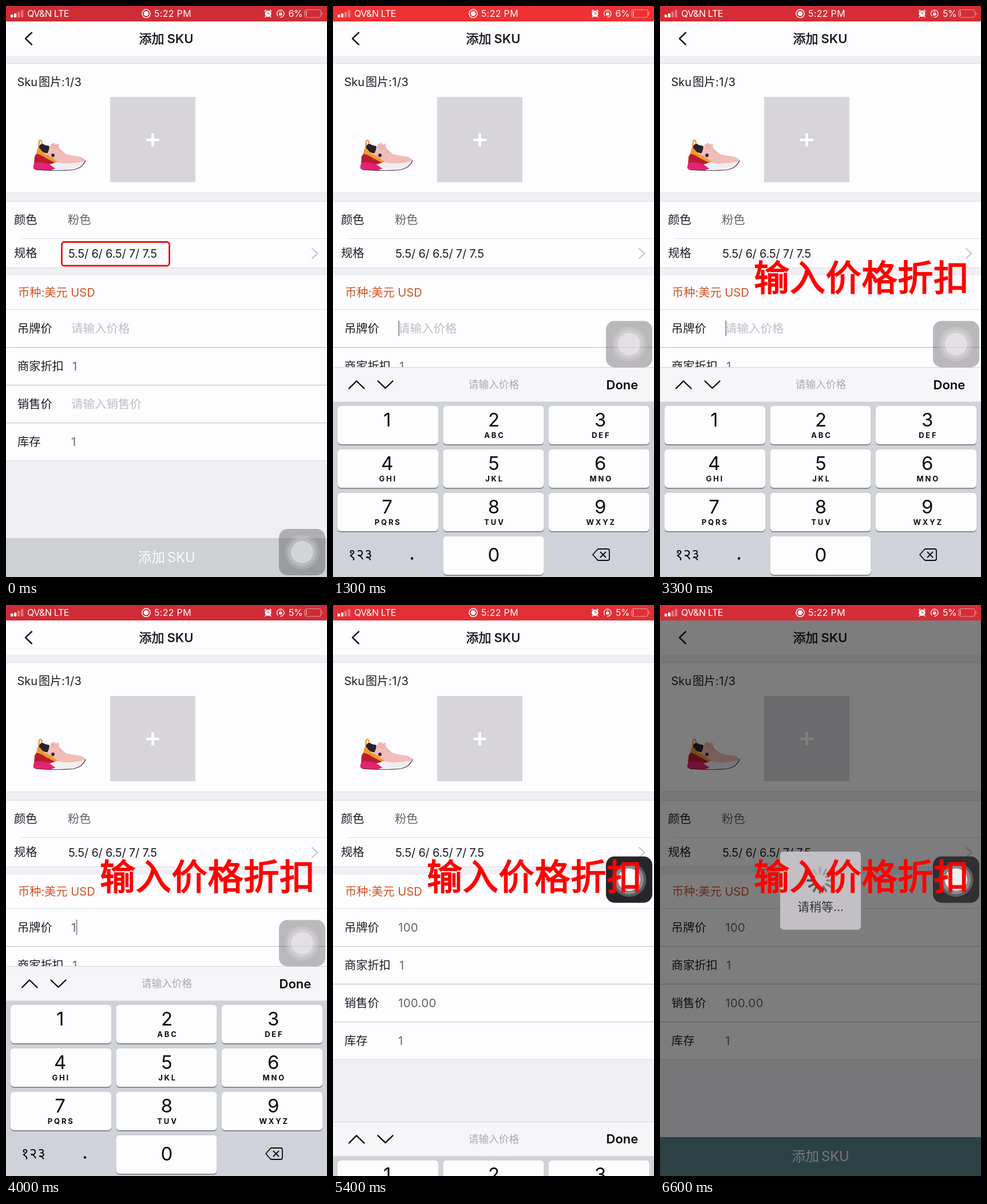
An HTML page for the animation above (6700 ms loop, 561x998 px).

```html
<!DOCTYPE html>
<html lang="zh">
<head>
<meta charset="utf-8">
<title>添加SKU</title>
<style>
html, body { margin: 0; width: 100%; height: 100%; overflow: hidden; background: #f0eff4; }
svg { display: block; width: 100vw; height: 100vh; }
text { font-family: Inter, "Noto Sans CJK SC", "Noto Sans CJK", sans-serif; white-space: pre; }
.line { fill: none; stroke-linecap: round; stroke-linejoin: round; }
.hindi { font-family: "Noto Sans Devanagari", "Noto Sans", sans-serif; }
</style>
</head>
<body>
<svg id="stage" viewBox="0 0 561 998" preserveAspectRatio="none"></svg>
<script>
const LOOP = 6700, STEP = 100;
const INK = '#1d1c20', GREY = '#646367', HINT = '#bfbec3', CARD = '#fdfcfe', KEY = '#0b0b0d';

const rect = (x, y, w, h, fill, more = '') =>
  `<rect x="${x}" y="${y}" width="${w}" height="${h}" fill="${fill}" ${more}/>`;
const circle = (x, y, r, fill, more = '') =>
  `<circle cx="${x}" cy="${y}" r="${r}" fill="${fill}" ${more}/>`;
const path = (d, fill, more = '') => `<path d="${d}" fill="${fill}" ${more}/>`;
const line = (d, color, width, more = 'class="line"') =>
  `<path d="${d}" stroke="${color}" stroke-width="${width}" ${more}/>`;
const text = (x, y, size, fill, str, more = '') =>
  `<text x="${x}" y="${y}" font-size="${size}" fill="${fill}" ${more}>${str}</text>`;
const group = (id, body) => `<g id="${id}">${body}</g>`;
const MID = 'text-anchor="middle"';

function statusBar() {
  const bars = [5, 7, 10, 13].map((h, i) =>
    rect(8 + i * 6, 20 - h, 4.3, h, '#fff', `rx="1" opacity="${i < 2 ? 1 : .35}"`)).join('');
  const clock = circle(458, 13.5, 5.6, '#fff') +
    line('M452.5 9l2-1.8M463.5 9l-2-1.8M454 18.5l-1 1M462 18.5l1 1', '#fff', 1.6) +
    line('M458 10.5v3.2h2.6', '#d22d36', 1);
  const lock = line('M475 17.5a6.3 6.3 0 1 1 4.5 2.2', '#fff', 1.3) +
    rect(477, 12.5, 5.6, 4, '#fff', 'rx=".8"') + line('M478.4 12.5v-1.2a1.4 1.4 0 0 1 2.8 0v1.2', '#fff', 1);
  const battery = rect(522, 6.5, 28.5, 13.5, 'none', 'rx="4" stroke="#fff" stroke-opacity=".5" stroke-width="1.2"') +
    rect(524, 8.5, 1.6, 9.5, '#fff', 'rx=".8" opacity=".6"') +
    path('M552 11q2.6 2.2 0 4.6z', '#fff', 'opacity=".5"');
  return rect(0, 0, 561, 27, '#d02c36', 'id="bar"') + bars +
    text(37, 19, 16, '#fff', 'QV&amp;N LTE', 'letter-spacing="-.4"') +
    circle(245, 13.3, 7.2, 'none', 'stroke="#fff" stroke-width="1.5"') + circle(245, 13.3, 4.3, '#fff') +
    text(259, 19, 16, '#fff', '5:22 PM', 'letter-spacing=".3"') + clock + lock +
    text(518.5, 19, 16, '#fff', '6%', 'id="charge" text-anchor="end" letter-spacing="-.3"') + battery;
}

function shoe() {
  return line('M57 247l1-11q2-3 4 0l2 9', '#f0932b', 2.2) +
    path('M57 249l2-6q4-4 9 0l8 2q0 7-4 13-10-2-15-9z', '#2a2229') +
    path('M70 262q6-8 8-20l6-3 3 3 5-2 1 9 12 10q12 3 24 4 11 4 10 9l-5 3q-25 2-40 1l-20-7z', '#f2bdb8') +
    line('M79 247l9 3M80 243l9 3M92 249l5 8', '#dfa19f', 1.3) +
    path('M50 263l4-6q10 2 17 8l17 9-6 5-24-4-9 2z', '#b91c31') +
    path('M53 258l2-9q3-2 5 1 5 8 14 11l16 11-4 2-16-8q-8-6-17-8z', '#f09a28') +
    path('M48 279q1-7 10-6l20 3 9 8-8 3q-25 1-30-2-2-2-1-6z', '#e32373') +
    path('M76 277l12-4q22 5 46-1l6-3q1 6-5 9-18 8-46 8z', '#f0eef1') +
    line('M52 286q40 3 67 0 15-3 20-16', '#46343d', 1.2) +
    circle(82, 261, 3, '#29242b');
}

function page() {
  const cards = [[27, 60], [101, 225], [342, 115], [471, 323]]
    .map(([y, h]) => rect(0, y, 561, h, CARD)).join('');
  const rules = [100, 326, 341, 457, 530, 794].map(y => rect(0, y, 561, 1, '#dddce0')).join('') +
    [596, 662, 728].map(y => rect(0, y, 561, 1.3, '#c9c8cc')).join('') + rect(27, 406, 534, 1, '#dddce0');
  const labels = [
    [14, 381, '颜色'], [14, 439, '规格'], [20, 571, '吊牌价'],
    [20, 637, '商家折扣'], [20, 703, '销售价'], [20, 769, '库存']
  ].map(([x, y, s]) => text(x, y, 20.2, INK, s)).join('');
  return rect(0, 0, 561, 998, '#f0eff4') + cards + rules + labels +
    line('M45 46.5L34 57l11 10.5', INK, 2.5) +
    text(232.5, 65, 22, INK, '添加', `stroke="${INK}" stroke-width=".6"`) +
    text(281.5, 65, 22, INK, 'SKU', 'font-weight="600"') +
    text(19.5, 140, 20, INK, 'Sku<tspan x="57">图片</tspan><tspan letter-spacing=".5">:1/3</tspan>') +
    shoe() + rect(182, 159, 149, 149, '#d7d5d9') +
    line('M245 234h23M256.5 222.5v23', '#fff', 4.6, '') +
    text(108, 381, 20.2, GREY, '粉色') +
    text(109, 439.5, 20, INK, '5.5/ 6/ 6.5/ 7/ 7.5', 'letter-spacing="-.22"') +
    line('M535 424l9.5 8.5-9.5 8.5', '#c8c7cb', 2.3) +
    text(21, 508, 20.2, '#d05424', '币种:美元 USD') +
    text(114, 571, 20.5, HINT, '', 'id="price"') +
    text(116, 637, 20, GREY, '1') +
    text(114, 703, 20.5, HINT, '', 'id="sale"') +
    text(114, 769, 20, GREY, '1') +
    rect(0, 930, 561, 68, '#cdd1d4', 'id="add"') +
    text(230.5, 972, 23.7, '#fff', '添加<tspan x="282">SKU</tspan>', 'opacity=".9"') +
    rect(114, 550, 2.2, 27, '#9b9a9f', 'id="caret"') +
    rect(97.5, 412.5, 188, 41.5, 'none', 'id="mark" rx="4" stroke="#e01a16" stroke-width="2.8"');
}

function keypad() {
  const keys = ['', 'ABC', 'DEF', 'GHI', 'JKL', 'MNO', 'PQRS', 'TUV', 'WXYZ', ''];
  const cells = keys.map((letters, i) => {
    const zero = i === 9, col = zero ? 1 : i % 3;
    const x = 8 + col * 184.5, y = 699 + Math.floor(i / 3) * 76, mid = 94.7 + col * 186.3;
    return rect(x, y + 2, 176, 67, '#898a8e', 'rx="6"') + rect(x, y, 176, 67, CARD, 'rx="6"') +
      text(mid, y + (zero ? 44 : 36), 33, KEY, (i + 1) % 10, MID) +
      text(mid + 1.5, y + 56, 13, KEY, letters, MID + ' font-weight="700" letter-spacing="2.8"');
  }).join('');
  return rect(0, 631, 561, 61, '#f6f5f8') + rect(0, 631, 561, 1, '#d3d2d6') +
    rect(0, 691.5, 561, 307, '#cfd2d8') +
    line('M28 668.5L41 655.5l13.5 13M78.5 655.5L91.5 668l13-12.5', KEY, 2.4) +
    text(281, 668, 17.7, '#aaa9ae', '请输入价格', MID) +
    text(477.5, 669.5, 22, KEY, 'Done', 'font-weight="600"') + cells +
    text(26, 967, 26.3, KEY, '१२३', 'class="hindi"') +
    circle(138, 965.5, 2.3, KEY) +
    line('M454 959l8-9q1-1 3-1h15q3 0 3 3v14q0 3-3 3h-15q-2 0-3-1z', KEY, 1.8) +
    line('M467.5 954.5l9 9M476.5 954.5l-9 9', KEY, 1.8);
}

const touchButton = () =>
  group('idle', rect(-40.5, -40.5, 81, 81, '#242326', 'rx="15" opacity=".31"') +
    [[30, .14], [25, .18], [19.5, .38]].map(([r, a]) => circle(0, 0, r, '#fff', `opacity="${a}"`)).join('')) +
  group('active', rect(-40.5, -40.5, 81, 81, '#262529', 'rx="15"') +
    circle(0, 0, 30, '#5a595c') + circle(0, 0, 25.5, '#8b8a8d') + circle(0, 0, 19.5, '#fff'));

function dialog() {
  const spokes = Array.from({ length: 12 }, (_, i) =>
    line('M0-12.5V-21.5', '#464549', 4, `class="spoke line" transform="rotate(${i * 30})"`)).join('');
  return rect(0, 27, 561, 971, '#000', 'opacity=".5"') +
    rect(210, 431, 141, 136.5, '#c2c0c4', 'rx="6"') +
    `<g transform="translate(279.5 481.5)">${spokes}</g>` +
    text(280.5, 534.5, 21, '#343337', '请稍等...', MID);
}

const stage = document.getElementById('stage');
stage.innerHTML = page() + group('pad', keypad()) + group('wait', dialog()) + statusBar() +
  group('touch', touchButton()) +
  text(164, 498, 62, '#f00', '输入价格折扣', 'id="caption" stroke="#f00" stroke-width="2" letter-spacing=".8"');

const ui = {};
stage.querySelectorAll('[id]').forEach(el => ui[el.id] = el);
const spokes = [...stage.querySelectorAll('.spoke')];

const set = (el, values) => { for (const k in values) el.setAttribute(k, values[k]); };
const show = (el, on) => set(el, { opacity: +on });
const ease = p => p * p * (3 - 2 * p);

// Eased value at t from a table of [time, value].
function track(t, points) {
  const i = points.findIndex(p => p[0] > t);
  if (i < 0) return points[points.length - 1][1];
  if (i === 0) return points[0][1];
  const [t0, a] = points[i - 1], [t1, b] = points[i];
  return a + (b - a) * ease((t - t0) / (t1 - t0));
}
// Last value whose start time has passed.
const hold = (t, points) => points.filter(p => p[0] <= t).pop()[1];

const padTrack = [[800, 367], [1100, 0], [5200, 0], [5500, 367]];
const touchX = [[4500, 517.5], [4800, 515.5], [5000, 515.5], [5400, 517.5]];
const touchY = [[800, 954.5], [1100, 591], [4500, 591], [4800, 522], [5000, 522], [5400, 480]];
const activeTrack = [[4400, 0], [4600, 1], [6300, 1], [6600, .88]];
const prices = [[0, ''], [3800, '1'], [4200, '10'], [4500, '100']];
const carets = { '': 114, '1': 122.5, '10': 135, '100': 147.5 };
const dips = [0, 800, 1600, 2400, 3200, 4000, 5200, 6000, 6700];

function barColor(t) {
  const i = dips.findIndex(d => d > t);
  const phase = (t - dips[i - 1]) / (dips[i] - dips[i - 1]);
  const k = (1 - Math.cos(phase * 2 * Math.PI)) / 2;
  return `rgb(${208 + 34 * k},${44 + 6 * k},${54 - 2 * k})`;
}

function field(el, value, hint) {
  el.textContent = value || hint;
  set(el, { fill: value ? GREY : HINT, 'letter-spacing': value ? .3 : 0 });
}

function draw(t) {
  set(ui.bar, { fill: barColor(t) });
  ui.charge.textContent = t < 3200 ? '6%' : '5%';
  show(ui.mark, t < 700);
  show(ui.caption, t >= 1700);

  const price = hold(t, prices), done = t >= 5200;
  field(ui.price, price, '请输入价格');
  field(ui.sale, done ? '100.00' : '', '请输入销售价');
  set(ui.caret, { x: carets[price], opacity: +(t >= 800 && !done) });
  set(ui.add, { fill: done ? '#5b848b' : '#cdd1d4' });

  set(ui.pad, { transform: `translate(0 ${track(t, padTrack)})` });
  set(ui.touch, { transform: `translate(${track(t, touchX)} ${track(t, touchY)})` });
  const active = track(t, activeTrack);
  set(ui.active, { opacity: active });
  set(ui.idle, { opacity: 1 - active });

  set(ui.wait, { opacity: track(t, [[6100, 0], [6300, 1]]) });
  const head = 10 + Math.floor((t - 6600) / STEP);
  spokes.forEach((el, i) => {
    const age = ((head - i) % 12 + 12) % 12;
    set(el, { opacity: .15 + .85 * (1 - age / 11) });
  });
}

function tick() {
  const t = performance.now() % LOOP;
  draw(Math.floor(t / STEP) * STEP);
  requestAnimationFrame(tick);
}
tick();
</script>
</body>
</html>
```
